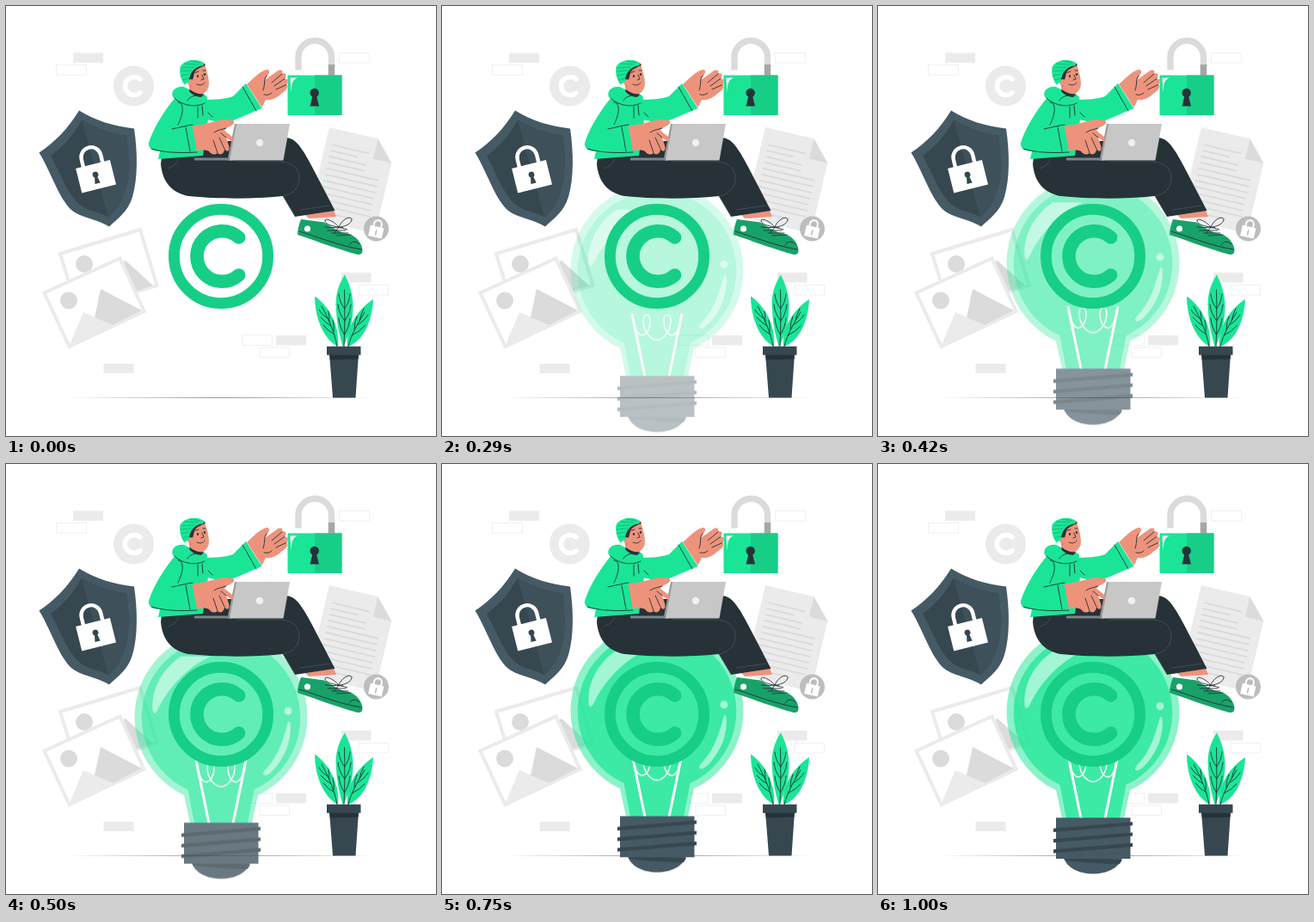
An HTML page that plays this animation: 500x500 px, repeating every 1.04 s.

```html
<!DOCTYPE html>
<html lang="en">
<head>
<meta charset="utf-8">
<title>Copyright idea</title>
<style>
  html, body { margin: 0; width: 100%; height: 100%; overflow: hidden; background: #fff; }
  svg { display: block; width: 100%; height: 100%; }
  .green { fill: #1ae596; }
  .mid { fill: #17ce87; }
  .dark { fill: #263238; }
  .slate { fill: #37474f; }
  .steel { fill: #455a64; }
  .skin { fill: #ed937c; }
  .pale { fill: #ebebeb; }
  .grey { fill: #dbdbdb; }
  .white { fill: #fff; }
  .line { fill: none; stroke: #263238; stroke-width: .9; stroke-linecap: round; stroke-linejoin: round; }
  .box { fill: #fff; stroke: #f0f0f0; stroke-width: 1; }
  .frame { fill: #fff; stroke: #ebebeb; stroke-width: 4; }

  /* slide up with a slight overshoot, then hold until the loop restarts */
  .bulb { animation: rise 1040ms infinite; }
  @keyframes rise {
    0% { opacity: 0; transform: translateY(30px); animation-timing-function: cubic-bezier(.347, .076, .499, 1.369); }
    92.8%, 100% { opacity: 1; transform: translateY(0); }
  }
</style>
</head>
<body>
<svg viewBox="0 0 500 500">
  <defs>
    <path id="c" d="M20.600 -22A29.300 29.300 0 1 0 20.600 22" fill="none" stroke-width="15.600" stroke-linecap="round"/>
  </defs>

  <!-- background cards and floor -->
  <g class="pale">
    <rect x="78" y="54.500" width="35" height="11.500"/>
    <rect x="390" y="310" width="34.500" height="11.500"/>
    <rect x="314" y="383" width="35" height="11.500"/>
    <rect x="113.500" y="416" width="35" height="11"/>
  </g>
  <g class="box">
    <rect x="58.500" y="68.500" width="35" height="11.500"/>
    <rect x="387.500" y="54.500" width="35" height="11.500"/>
    <rect x="410" y="324.500" width="34.500" height="11.500"/>
    <rect x="275" y="383" width="34.500" height="11.500"/>
    <rect x="295" y="397" width="34.500" height="11.500"/>
  </g>
  <path class="dark" d="M70 455.300L250 455L431 455.300L250 455.600Z"/>

  <!-- pictures -->
  <path class="frame" d="M63 288L156 260L175.500 325L83 353Z"/>
  <circle class="grey" cx="91" cy="300" r="10"/>
  <path class="grey" d="M130 300L139 296L171 325L150 332Z"/>
  <path class="frame" d="M44.500 333.500L132.500 293.500L160.500 355L73.500 396Z"/>
  <circle class="grey" cx="73" cy="342.500" r="10"/>
  <path class="pale" d="M74 394L90 356L124 371Z"/>
  <path class="grey" d="M103 362L110 329L158 354L124 371Z"/>

  <g transform="translate(148.500 93)">
    <circle class="pale" r="23.600"/>
    <use href="#c" transform="scale(.36)" stroke="#fff"/>
  </g>

  <!-- document -->
  <g transform="translate(376 141) rotate(13.300)">
    <path class="pale" d="M0 0H58L80 24V108H0Z"/>
    <path class="grey" d="M58 0L80 24H58Z"/>
    <path d="M8 19H52M8 26H40M8 33H52M8 40H52M8 47.200H70M8 54.400H70M8 61.600H70M8 68.800H70M8 76H70M8 83.200H70M8 90.400H70M8 97.600H52" fill="none" stroke="#dbdbdb" stroke-width="1.900"/>
  </g>
  <circle cx="430.500" cy="259" r="14.500" fill="#bdbdbd"/>
  <g transform="translate(430.500 262) rotate(13)">
    <rect class="white" x="-8" y="-5.500" width="16" height="12.500"/>
    <path d="M-4.500 -5V-8.500A4.500 4.500 0 0 1 4.500 -8.500V-5" fill="none" stroke="#fff" stroke-width="2"/>
    <path d="M0 -1V4" stroke="#bdbdbd" stroke-width="1.600" stroke-linecap="round"/>
  </g>

  <!-- open padlock -->
  <path d="M340 74.500V59.500A19 19 0 0 1 378.500 59.500V81" fill="none" stroke="#dbdbdb" stroke-width="7.400"/>
  <rect x="374.800" y="68" width="7.400" height="13" fill="#a6a6a6"/>
  <rect class="green" x="327.500" y="80.500" width="63" height="46.500"/>
  <rect class="mid" x="359" y="80.500" width="31.500" height="46.500"/>
  <path class="white" d="M330.500 83.500H339C334 85 332 89 331.500 101Z"/>
  <circle class="dark" cx="358.700" cy="101" r="5.200"/>
  <path class="dark" d="M356.800 103H360.600L364 116.500H353.500Z"/>

  <!-- shield -->
  <path class="steel" d="M85 121.500C103 133 126 140 149 142.500C153 170 153.500 200 147 222C142 239 130 247 120 256.500C108 249 92 247 80 240C63 229 54 196 38.500 170.500C56 159 72 143 85 121.500Z"/>
  <path class="slate" d="M88 132.500C104 142 121 148 140 150.500C144 176 143.500 200 138 216C133 231 126 239 119 245.500C107 239 96 239 86 231C72 220 64 196 52 174C66 164 78 151 88 132.500Z"/>
  <path d="M88 132.500C104 142 121 148 140 150.500C144 176 143.500 200 138 216C133 231 126 239 119 245.500Z" fill="#3e505a"/>
  <g transform="translate(104.500 198) rotate(-14)">
    <rect class="white" x="-20.500" y="-14.500" width="41" height="29.500"/>
    <path d="M-11.500 -13V-23A11.500 11.500 0 0 1 11.500 -23V-13" fill="none" stroke="#fff" stroke-width="4.400"/>
    <circle class="slate" cy="-2" r="3.400"/>
    <path class="slate" d="M-1.300 -1H1.300L3.200 8.500H-3.200Z"/>
  </g>

  <!-- plant -->
  <path class="green" d="M359 337.500C359 359 367 386 386 396C388 378 380 352 359 337.500Z"/>
  <path class="green" d="M427 341C426 365 416 390 397 396C395 373 409 353 427 341Z"/>
  <path class="green" d="M394 312.500C387 323 382 336 384 355C385 373 389 387 392 397C399 382 404 366 403.500 347C403 333 399 323 394 312.500Z"/>
  <path class="line" d="M367 349C375 364 382 379 385 396M393.500 330C394 352 394 374 393 396M417 356C409 369 401 383 398 396"/>
  <path class="line" stroke-width=".7" d="M374 363Q367 359 364 353M378 372Q371 368 366 362M382 382Q374 378 369 371M376 367Q376 360 375 355M381 379Q382 372 380 365M393.700 352Q388 345 387 335M393.800 366Q387 358 386 347M393.500 382Q388 374 387 363M393.700 352Q399 345 400 335M393.800 366Q400 358 401 347M393.500 382Q399 374 400 363M411 366Q412 360 416 352M405 376Q405 369 408 361M408 371Q416 367 421 359M402 383Q411 379 417 372"/>
  <path class="slate" d="M376 404H410L406.500 455.500H380Z"/>
  <path class="dark" d="M376 405H410L409.600 410.500L376.800 411.500Z"/>
  <rect class="slate" x="373" y="395.800" width="39.500" height="10"/>

  <!-- light bulb -->
  <g class="bulb">
    <path class="green" opacity=".5" d="M207 379.300A100.500 100.500 0 1 1 293 379.300L286 412H214Z"/>
    <path class="green" opacity=".7" d="M211.500 373A92.300 92.300 0 1 1 288.500 373L281 412H219Z"/>
    <g class="white" opacity=".52">
      <path d="M170.500 280C169 258 180 234 203 218H238C211 230 189 254 177 279C174 285 171 286 170.500 280Z"/>
      <path d="M328 294C332 291 332 309 327 324C320 341 310 353 303 356C298 357 297 354 304 347C317 333 323 313 328 294Z"/>
      <circle cx="328" cy="281.500" r="4.500"/>
    </g>
    <g fill="none" stroke="#fff">
      <path d="M221 339L236 412M279 339L264 412" stroke-width="3"/>
      <path d="M222 345C224 358 229 364 233 364C239 363 242 355 242 348C242 338 234 338 234 347C234 360 243 369.500 250 369.500C257 369.500 266 360 266 347C266 338 258 338 258 348C258 355 261 363 267 364C271 364 276 358 278 345" stroke-width="1.400"/>
    </g>
    <path class="steel" d="M216 458C220 470 234 476.500 250 476.500C266 476.500 280 470 284 458Z"/>
    <path class="slate" d="M215 457L284 460L281 465C258 465 236 463 218 461Z"/>
    <rect class="steel" x="207" y="411.300" width="86.500" height="47.700"/>
    <g class="slate">
      <path id="thread" d="M204 423.700L296 416.200V420.300L204 428Z"/>
      <use href="#thread" y="12.300"/>
      <use href="#thread" y="24.600"/>
    </g>
  </g>

  <g transform="translate(250 291)" stroke="#17ce87">
    <circle r="54.600" fill="none" stroke-width="12.800"/>
    <use href="#c"/>
  </g>

  <!-- shoe and legs -->
  <path class="skin" d="M348 243L381 238L384 245L352 247Z"/>
  <path d="M343 248L370 251.500C378 256 386 263 400 265.500C409 269 415 278 414.500 285C414 288.500 412 289.500 408 288.700C386 283 363 274 339 266C339 260 341 253 343 248Z" fill="#18a269"/>
  <path class="line" d="M341 262C364 269 388 279 413 283M399 278C402 273 407 273 411 277"/>
  <circle class="white" cx="350.500" cy="259" r="3.600"/>
  <path class="line" d="M371 257L392 258M374 261L395 261M379 264L398 264M384 267L401 266M387 257C380 249 371 246 371 250C372 254 380 256 387 257C390 249 400 243 402 248C402 253 394 257 387 257L382 264M387 257L397 260"/>
  <path class="dark" d="M181 174L326 153C336 154 341 162 347 171C358 190 370 214 382.500 238L336 245L322 221C285 225 241 224 212 221C192 217 182 204 180 184Z"/>
  <path d="M201 178C198 184 194 187 188 189M268 181H318C334 181 341 191 341 200C341 212 333 219 322 221L336 244M342 237L377 232" fill="none" stroke="#4b5960" stroke-width=".7"/>

  <!-- hoodie -->
  <path class="green" d="M228 109C244 109 256 108 264 105L279 90L297.500 119L267 132C256 136 245 135 233 132Z"/>
  <path class="green" d="M198 105L229 107C236 115 238 123 235 132L229 174L177 178L179 169C170 169 165 165 166 159C171 143 184 121 198 105Z"/>
  <path class="green" d="M193.500 105C192 97 199 93 207 94L217 99L231 103C236 106 235 113 229 115C215 118 200 114 193.500 105Z"/>
  <path class="line" d="M196 107C204 115 219 119 231 113M211 110C213 106 218 103 229 104M200 112C206 112 208 122 200 138M223 117V130M228 116L229 127M235 124L240 129M169 166C185 171 205 171 222 170M193 143C202 141 210 139 217 138M209 141L214 169M275 94L291 122"/>

  <!-- head -->
  <path class="skin" d="M212 76L231 68C234 77 237 87 235.500 94C233 101 228 104 220 104L213 98Z"/>
  <path class="dark" d="M212 86C212 76 217 67 225 65C229 65 231 67 232 69C227 71 221 73 219 78L217 86L215 94Z"/>
  <path class="dark" d="M214 97C219 101 224 103 230 102L227 106C222 106 216 103 213 99Z"/>
  <circle class="skin" cx="215" cy="89" r="3.700"/>
  <path class="green" d="M207.500 91.500C204 87 201 78 202.500 71C206 64 217 61 226 64L231 66.500L229 69.500C219 70 213 78 213 88Z"/>
  <path d="M205 86L213 84M203 81L213 79M203 76L216 75M204 72L219 71M207 67L223 68M214 64L226 66" fill="none" stroke="#13ad72" stroke-width=".7"/>
  <path class="line" d="M220 77.500L224 76M229 75L232 75M228 80L230 85L227 86M222 91C226 93 229 92 231 89"/>
  <ellipse class="dark" cx="223" cy="81.500" rx="1.100" ry="1.600"/>
  <ellipse class="dark" cx="231" cy="79.500" rx="1.100" ry="1.600"/>

  <!-- raised hand -->
  <path class="skin" d="M280 91C287 85 292 79 300 75C306 72 308 76 304 81L301 86L315 76C319 73 323 75 321 78.500C326 77 327 81 324 84.500C328 84 329 88 326 91.500C329 95 325 99 320 102C314 108 307 110 302 109L297.500 118Z"/>
  <path class="line" d="M303 81C299 86 302 89 299 98M321 79L309 89M324 84.500L312 93M326 91.500L314 97M300 103C304 104 307 103 309 101"/>

  <!-- laptop and typing hand -->
  <path class="dark" d="M246 175L255 157H267L262 178Z"/>
  <path d="M266 137H271L263 179.500H257.500Z" fill="#999"/>
  <path d="M268 137H330L322.500 179.500H260Z" fill="#c7c7c7"/>
  <circle cx="295" cy="159" r="4.200" fill="#f0f0f0"/>
  <path d="M219 176.500H260V179.500H219Z" fill="#7c8589"/>
  <path class="skin" d="M216.500 139.500C232 138 241 134 253 132L263 132.500C268 135 265 138 256 142L254 145L262 151C266 155 264 159 260 156L256 153L259 162C261 169 257 171 254 166C254 172 249 174 246 171C242 174 238 172 236 169C233 167 227 167 222 169Z"/>
  <path class="line" d="M256 142C250 144 246 144 242 147M256 153L250 148M254 166L248 153M246 171L241 156"/>
</svg>
</body>
</html>
```
